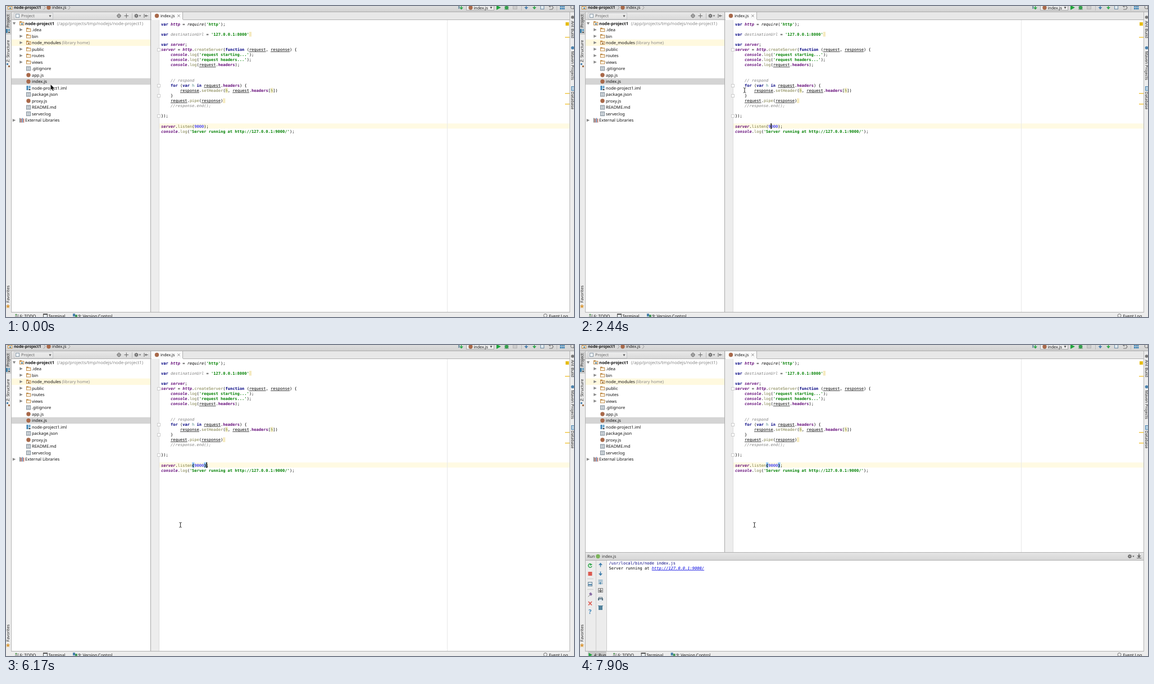
An HTML page with a canvas for the animation above (8000 ms loop, 1011 by 554 pixels).

```html
<!DOCTYPE html>
<html lang="en">
<head>
<meta charset="utf-8">
<title>Running a script in the editor</title>
<style>
html, body { margin: 0; width: 100%; height: 100%; overflow: hidden; background: #fff; }
canvas { display: block; }
</style>
</head>
<body>
<canvas id="stage" width="1011" height="554"></canvas>
<script>
const ctx = document.getElementById('stage').getContext('2d');
const LOOP = 8000, FOCUS = 960, UNFOCUS = 1190, CLICK = 4040;
const RUN_TAB = 7090, RUN_PANEL = 7570, OUTPUT = 7900;
const UI = '"Noto Sans", sans-serif', MONO = '"DejaVu Sans Mono", monospace';
const CHAR = 4.24, LINE = 9.1, CODE_X = 276, CODE_SIZE = 7.04;
const NODE = '#a8694a', BLUE = '#3f7fa6', GREEN = '#2fa84a', GREY = '#777';

// time, x, y of the pointer
const pointer = [
  [0, 79.5, 140], [210, 74, 137], [540, 70, 135.5], [1550, 282, 30], [1700, 296.5, 39],
  [1840, 296, 70], [1990, 295, 100], [2140, 294, 125], [2440, 293, 150], [2590, 293, 190],
  [2770, 293, 225], [2920, 293, 243], [3210, 320, 225], [3450, 358, 210], [3600, 358, 207],
  [3740, 358, 212], [4200, 403, 262], [4370, 330, 318], [4540, 295.5, 335], [4680, 297, 333],
  [4830, 300, 330], [4980, 305, 325], [5160, 310.5, 320.5]
];
const blinks = [960, 1550, 1990, 2590, 2920, 3600, CLICK, 4680, 5160, 5690, 6170, 6740, 7270, 7900];

const styles = {
  k: ['bold', '#000080'], p: ['bold italic', '#660e7a'], b: ['bold', '#660e7a'],
  d: ['', '#000'], i: ['italic', '#000'], s: ['bold', '#008000'], g: ['italic', '#808080'],
  f: ['', '#7a7a43'], u: ['', '#000'], n: ['', '#0000ff'], v: ['', '#458383'], h: ['', '#7a8a43']
};
// each part starts with its style letter
const code = {
  0: "kvar ~phttp~d = ~irequire~d(~s'http'~d);",
  2: "kvar ~gdestinationUrl~d = ~s'127.0.0.1:8000'",
  4: 'kvar ~pserver~d;',
  5: 'pserver~d = ~phttp~d.~fcreateServer~d(~kfunction ~d(~urequest~d, ~uresponse~d) {',
  6: "d    ~pconsole~d.~flog~d(~s'request starting...'~d);",
  7: "d    ~pconsole~d.~flog~d(~s'request headers...'~d);",
  8: 'd    ~pconsole~d.~flog~d(~urequest~d.~bheaders~d);',
  11: 'd    ~g// respond',
  12: 'd    ~kfor ~d(~kvar ~vh ~kin ~urequest~d.~bheaders~d) {',
  13: 'd        ~uresponse~d.~fsetHeader~d(~hh~d, ~urequest~d.~bheaders~d[~hh~d])',
  14: 'd    }',
  15: 'd    ~urequest~d.~fpipe~d(~uresponse~d)',
  16: 'd    ~g//response.end();',
  18: 'd});',
  20: 'pserver~d.~flisten~d(~n9000~d);',
  21: "pconsole~d.~flog~d(~s'Server running at http://127.0.0.1:9000/'~d);"
};
const tree = [
  ['root', 'node-project1'], ['folder', '.idea'], ['folder', 'bin'], ['library', 'node_modules'],
  ['folder', 'public'], ['folder', 'routes'], ['folder', 'views'], ['doc', '.gitignore'],
  ['js', 'app.js'], ['js', 'index.js'], ['module', 'node-project1.iml'], ['doc', 'package.json'],
  ['js', 'proxy.js'], ['doc', 'README.md'], ['doc', 'server.log'], ['libs', 'External Libraries']
];

function rect(x, y, w, h, color) { ctx.fillStyle = color; ctx.fillRect(x, y, w, h); }

function fade(x, y, w, h, top, bottom) {
  const g = ctx.createLinearGradient(0, y, 0, y + h);
  g.addColorStop(0, top);
  g.addColorStop(1, bottom);
  rect(x, y, w, h, g);
}

function text(s, x, y, color = '#111', size = 7.5, weight = '', family = UI) {
  ctx.font = `${weight} ${size}px ${family}`;
  ctx.fillStyle = color;
  ctx.fillText(s, x, y);
}

function sideText(s, x, y, turn, size = 7.2) {
  ctx.save();
  ctx.translate(x, y);
  ctx.rotate(turn * Math.PI / 2);
  text(s, 0, 0, '#222', size);
  ctx.restore();
}

function dot(x, y, r, color) {
  ctx.fillStyle = color;
  ctx.beginPath();
  ctx.arc(x, y, r, 0, 7);
  ctx.fill();
}

function ring(x, y, r, color) {
  ctx.strokeStyle = color;
  ctx.lineWidth = 1;
  ctx.beginPath();
  ctx.arc(x, y, r, 0, 7);
  ctx.stroke();
}

function shape(points, color) {
  ctx.fillStyle = color;
  ctx.beginPath();
  points.forEach(p => ctx.lineTo(...p));
  ctx.fill();
}

function line(points, color, width = 1) {
  ctx.strokeStyle = color;
  ctx.lineWidth = width;
  ctx.beginPath();
  points.forEach((p, i) => i ? ctx.lineTo(...p) : ctx.moveTo(...p));
  ctx.stroke();
}

function box(x, y, w, h, color, fill) {
  if (fill) rect(x, y, w, h, fill);
  ctx.strokeStyle = color;
  ctx.lineWidth = 1;
  ctx.strokeRect(x + .5, y + .5, w - 1, h - 1);
}

const right = (x, y, r, color) => shape([[x - r, y - r], [x + r, y], [x - r, y + r]], color);
const down = (x, y, r, color) => shape([[x - r, y - r * .7], [x + r, y - r * .7], [x, y + r]], color);

function arrow(x, y, dir, color) {
  line([[x, y - 3.5], [x, y + 3.5]], color, 1.4);
  shape([[x - 3.5, y], [x + 3.5, y], [x, y + 4 * dir]], color);
}

function gear(x, y) {
  for (let a = 0; a < 4; a++) {
    const c = Math.cos(a * Math.PI / 4) * 3.7, s = Math.sin(a * Math.PI / 4) * 3.7;
    line([[x - c, y - s], [x + c, y + s]], '#666', 1.3);
  }
  dot(x, y, 2.6, '#666');
  dot(x, y, 1.1, '#ddd');
  down(x + 6.5, y, 1.6, '#555');
}

function folder(x, y, mark) {
  shape([[x - 4, y - 3.5], [x - .5, y - 3.5], [x + .5, y - 2.3], [x + 4.3, y - 2.3], [x + 4.3, y + 3.7], [x - 4, y + 3.7]], '#bd8a48');
  rect(x - 3, y - 1.2, 6.3, 3.9, '#fff6e6');
  if (mark) rect(x - 1, y, 3, 2.4, mark);
}

const icons = {
  root: (x, y) => folder(x, y, '#4a88b0'),
  folder: (x, y) => folder(x, y),
  library: (x, y) => folder(x, y, '#a08050'),
  js: (x, y) => dot(x, y, 3.7, NODE),
  doc(x, y) {
    box(x - 4, y - 4, 8, 8, '#7d8b96', '#f4f7f9');
    for (let i = -2; i < 3; i += 2) rect(x - 2.5, y + i - .4, 5, .8, '#7d8b96');
  },
  module(x, y) {
    rect(x - 3.5, y - 4, 3, 8, '#3f86b8');
    rect(x + .5, y - 4, 3, 5, '#6aa5cc');
    rect(x + .5, y + 2, 3, 2, '#333');
  },
  libs(x, y) {
    [GREY, '#b8655a', '#5b86b4', '#b8655a'].forEach((c, i) => rect(x - 4 + i * 2.2, y - 4 + i % 2, 1.6, 8 - i % 2, c));
  }
};

function toolbar() {
  fade(0, 0, 1011, 10, '#dedede', '#d2d2d2');
  rect(0, 10, 1011, 1, '#aaa');
  folder(7, 2.5, '#4a88b0');
  text('node-project1', 14, 5.4, '#111', 7, 'bold');
  line([[67, -1], [70, 2.7], [67, 6.5]], '#999');
  dot(76, 2.7, 3.7, NODE);
  text('index.js', 82, 5.4, '#111', 7.1);
  line([[111, -1], [114, 2.7], [111, 6.5]], '#999');

  arrow(810.5, 2.5, 1, GREEN);
  rect(805, 0, 2.5, 5, '#7a98a8');
  box(819, -4, 50, 12, '#aaa', '#ececec');
  dot(827, 3, 3.7, NODE);
  text('index.js', 832.5, 5.5, '#111', 7.1);
  down(863.5, 3, 2, '#444');
  shape([[873, -1.5], [881, 2.8], [873, 7]], '#1fa53c');
  dot(891, 3, 3.2, GREEN);
  for (const y of [0, 3, 6]) line([[887, y], [895, y]], '#4b8457', .8);
  box(902, -2, 8, 8, '#b5b5b5', '#cbcbcb');
  rect(917, 0, 1, 8, '#bbb');
  arrow(926, 2, 1, '#467eb0');
  arrow(940.5, 2, 1, GREEN);
  box(951, -2, 7, 8, '#6f8da5', '#dfe8ee');
  line([[967, 0], [972, 0], [974, 3], [972, 6], [967, 6]], '#777', 1.2);
  shape([[969, -3], [969, 3], [965.5, 0]], '#777');
  rect(980, 0, 1, 8, '#bbb');
  for (let i = 0; i < 6; i++) rect(986 + i % 3 * 3, i < 3 ? -1 : 3, 2.3, 3.2, '#3f86b8');
  ring(1008, 2, 3, '#777');
  line([[1010, 4], [1012, 7]], '#777', 1.3);
}

function sideBars() {
  rect(0, 11, 9, 543, '#ececec');
  rect(0, 12, 9, 39, '#cfcfcf');
  rect(9, 11, 1, 535, '#b5b5b5');
  sideText('Project', 6.2, 38.5, -1);
  rect(0, 41, 3, 7, BLUE);
  rect(4, 41, 3, 4, '#6ca4c5');
  rect(4, 46, 3, 2, '#555');
  sideText('Z: Structure', 6.2, 100, -1);
  rect(1, 102, 3, 3, '#4b83ae');
  rect(4, 106, 3, 3, '#a0714c');
  sideText('Favorites', 6.2, 528.5, -1);
  const star = [];
  for (let i = 0; i < 10; i++) {
    const a = i * Math.PI / 5 - Math.PI / 2, r = i % 2 ? 1.8 : 4.2;
    star.push([3.5 + r * Math.cos(a), 535 + r * Math.sin(a)]);
  }
  shape(star, '#d99a3c');

  rect(1003, 11, 8, 543, '#ececec');
  rect(1003, 11, 1, 535, '#b5b5b5');
  sideText('Ant Build', 1006.3, 26.5, 1);
  sideText('Maven Projects', 1006.3, 80.5, 1);
  sideText('Database', 1006.3, 152.5, 1);
  dot(1008.5, 20, 2.8, '#777');
  dot(1008.5, 74.5, 2.8, '#4b83ae');
  box(1006, 143, 6, 8, '#4b83ae', '#b5d0e2');
}

function projectPanel(focused) {
  rect(10, 25, 247, 521, '#fff');
  if (focused) fade(10, 11, 247, 13, '#d0d9ed', '#bfcae4');
  else fade(10, 11, 247, 13, '#e8e8e8', '#dadada');
  rect(10, 24, 247, 1, '#b0b0b0');
  box(14, 12, 70, 12, 'rgba(120,125,135,.3)', 'rgba(255,255,255,.2)');
  box(17, 14, 7, 7, '#8b9aa8', '#eef3f7');
  text('Project', 27, 20.3, '#666', 7.3);
  down(78.5, 18, 2, '#555');
  ring(201, 17.5, 3, '#666');
  line([[197, 17.5], [205, 17.5]], '#666', .8);
  line([[201, 13.5], [201, 21.5]], '#666', .8);
  line([[210.5, 17.5], [218, 17.5]], '#666');
  line([[214.3, 13.5], [214.3, 21.5]], '#666');
  rect(224, 13, 1, 10, '#bbb');
  gear(232, 17.5);
  line([[246, 14], [246, 21]], '#666');
  line([[247, 17.5], [253, 17.5]], '#666');
  shape([[250, 15.3], [250, 19.7], [247, 17.5]], '#666');

  rect(10, 59.6, 247, 11.5, '#fff9df');
  rect(10, 128.7, 247, 11.5, '#d4d4d4');
  tree.forEach(([kind, name], i) => {
    const y = 30.8 + i * 11.52, top = kind === 'root' || kind === 'libs';
    icons[kind](top ? 28 : 40, y);
    if (kind === 'root') down(14.5, y, 2.7, '#888');
    else if (kind === 'libs') right(14.5, y, 2.7, '#888');
    else if (kind === 'folder' || kind === 'library') right(27, y, 2.7, '#888');
    text(name, top ? 34 : 46, y + 2.7, '#111', 7.5, kind === 'root' ? 'bold' : '');
  });
  text('(/app/projects/tmp/nodejs/node-project1)', 91, 33.5, '#888', 7.8);
  text('(library home)', 99.5, 68.1, '#888');
  rect(257, 11, 1, 535, '#a8a8a8');
}

function codeLine(source, x, y) {
  for (const part of source.split('~')) {
    const s = part.slice(1), [weight, color] = styles[part[0]], w = s.length * CHAR;
    if (part[0] === 'h') rect(x, y - 7, w, 9, '#f2ebc4');
    text(s, x, y, color, CODE_SIZE, weight, MONO);
    if (part[0] === 'u') rect(x, y + 1, w, .8, '#222');
    x += w;
  }
}

function editor(t) {
  rect(258, 11, 745, 13, '#e8e8e8');
  rect(258, 24, 745, 1, '#b0b0b0');
  rect(259, 11, 56, 14, '#fafafa');
  rect(314, 11, 1, 13, '#b0b0b0');
  dot(268.5, 17.5, 3.7, NODE);
  text('index.js', 275, 20.2, '#111', 7.1);
  line([[305.5, 15.5], [309.5, 19.5]], '#777');
  line([[309.5, 15.5], [305.5, 19.5]], '#777');

  rect(258, 25, 745, 521, '#fff');
  rect(258, 209.3, 745, 9.1, '#fffae3');
  rect(258, 25, 14, 521, '#ededed');
  rect(272, 25, 1, 521, '#dcdcdc');
  rect(785, 25, 1, 521, '#e8e8e8');
  rect(432.7, 46, 4.3, 8.5, '#f5eac0');
  rect(386, 164.5, 4.3, 8.5, '#f5eac0');
  for (const y of [75, 139, 157, 193]) box(269, y, 6, 6, '#ccc', '#fff');
  rect(996, 29, 6, 6, '#e6bd16');
  for (const y of [55, 155, 174]) rect(995, y, 8, 1.4, '#efc338');

  const clicked = t >= CLICK, parens = [13, 18].map(col => CODE_X + col * CHAR);
  if (clicked) parens.forEach(x => rect(x, 209, CHAR, 9.5, '#99ccff'));
  for (const row in code) codeLine(code[row], CODE_X, 34.6 + row * LINE);
  if (clicked) parens.forEach((x, i) => text('()'[i], x, 216.6, '#000', CODE_SIZE, 'bold', MONO));
  if (blinks.filter(b => b <= t).length % 2) rect(clicked ? 356.5 : 339.5, 209, 1.5, 10, '#000');
}

function runPanel(done) {
  rect(10, 369, 993, 177, '#fff');
  fade(10, 369, 993, 14, '#e6e6e6', '#d6d6d6');
  rect(10, 369, 993, 1, '#b0b0b0');
  rect(10, 383, 993, 1, '#b0b0b0');
  text('Run', 13, 379, '#333', 7.2);
  dot(32, 376.5, 3.7, '#7cb45c');
  text('index.js', 39, 379, '#333', 7.1);
  gear(978.5, 376.5);
  line([[991, 379.5], [999, 379.5]], '#666');
  arrow(995, 375, 1, '#666');

  rect(10, 384, 37, 162, '#ececec');
  rect(28, 384, 1, 162, '#ccc');
  rect(47, 384, 1, 162, '#ccc');
  ctx.strokeStyle = GREEN;
  ctx.lineWidth = 1.5;
  ctx.beginPath();
  ctx.arc(18, 393, 3.2, .3, 5);
  ctx.stroke();
  right(20, 391, 2.3, GREEN);
  rect(14.5, 404, 7, 7, '#dc5a50');
  rect(13, 416, 11, 1, '#ccc');
  box(14, 422, 8, 8, '#6d8799', '#d9e4ea');
  rect(15, 426, 6, 2, '#4b83ae');
  rect(13, 435, 11, 1, '#ccc');
  line([[14.5, 448.5], [18, 445]], '#777');
  shape([[16, 443], [19, 440.5], [22, 444], [19.5, 447]], '#8a6fa5');
  line([[15, 457], [21, 463.5]], '#dc5a50', 1.7);
  line([[21, 457], [15, 463.5]], '#dc5a50', 1.7);
  text('?', 15.3, 479, '#3f86b8', 11, 'bold');

  const tone = done ? '#3f7fae' : '#b5b5b5';
  arrow(36.5, 392, -1, tone);
  arrow(36.5, 407, 1, tone);
  for (const y of [419, 422, 425]) line([[32.5, y], [40.5, y]], BLUE);
  shape([[37, 422], [37, 427], [34.5, 424.5]], BLUE);
  box(32, 433, 9, 8, '#888', '#ddd');
  arrow(36.5, 437, 1, '#777');
  box(33, 449, 7, 3, '#5a7384', '#fff');
  rect(32, 451, 9, 4, '#5a7384');
  rect(34, 453, 5, 4, '#dfe8ee');
  rect(33, 465, 7, 7, '#52829c');
  rect(32, 464, 9, 1, '#52829c');

  const urlX = 51.5 + 18 * CHAR;
  text('/usr/local/bin/node index.js', 51.5, 390.7, '#000080', CODE_SIZE, '', MONO);
  if (!done) return;
  text('Server running at ', 51.5, 399.8, '#000', CODE_SIZE, '', MONO);
  text('http://127.0.0.1:9000/', urlX, 399.8, '#0000e0', CODE_SIZE, 'italic', MONO);
  rect(urlX, 400.8, 22 * CHAR, .8, '#0000e0');
}

function statusBar(t) {
  rect(0, 546, 1011, 8, '#ececec');
  rect(9, 545, 995, 1, '#b0b0b0');
  const label = (s, x) => text(s, x, 554.6, '#111', 7.3);
  let shift = 0;
  if (t >= RUN_TAB) {
    shift = 42.7;
    if (t >= RUN_PANEL) rect(14, 546, 33, 8, '#c8c8c8');
    shape([[15.5, 548.5], [22, 552], [15.5, 555.5]], '#1fa53c');
    label('4: Run', 25);
  }
  ctx.save();
  ctx.translate(shift, 0);
  dot(18, 550, 1.6, '#5a9a5c');
  line([[16, 553], [23, 553]], '#777');
  line([[20, 550.5], [23, 550.5]], '#777');
  label('6: TODO', 24.5);
  box(66, 548, 8, 8, '#555', '#e9eef1');
  rect(66, 548, 8, 2, '#555');
  label('Terminal', 75.5);
  rect(119, 548, 4, 5, '#4b83ae');
  rect(123, 550, 4, 5, '#4a9a5c');
  label('9: Version Control', 128.5);
  ctx.restore();
  ring(960, 551.5, 3, '#777');
  label('Event Log', 966.5);
}

function drawPointer(t) {
  const [, x, y] = pointer.filter(p => p[0] <= t).pop();
  if (x < 258) {
    const tip = [[0, 0], [0, 9.5], [2.2, 7.5], [3.8, 11], [5.3, 10.3], [3.8, 7], [6.7, 6.8]].map(([a, b]) => [x + a, y + b]);
    line([...tip, tip[0]], '#fff', 1.2);
    shape(tip, '#111');
  } else {
    line([[x, y - 4], [x, y + 4]], '#333', 1.1);
    for (const d of [-1, 1]) line([[x - 2.3, y + 4.5 * d], [x, y + 3.6 * d], [x + 2.3, y + 4.5 * d]], '#333', .9);
  }
}

function draw(now) {
  const t = now % LOOP;
  ctx.textRendering = 'geometricPrecision';
  toolbar();
  projectPanel(t >= FOCUS && t < UNFOCUS);
  editor(t);
  if (t >= RUN_PANEL) runPanel(t >= OUTPUT);
  sideBars();
  statusBar(t);
  drawPointer(t);
}

let start;
function tick(now) {
  start ??= now;
  draw(now - start);
  requestAnimationFrame(tick);
}
requestAnimationFrame(tick);
</script>
</body>
</html>
```
